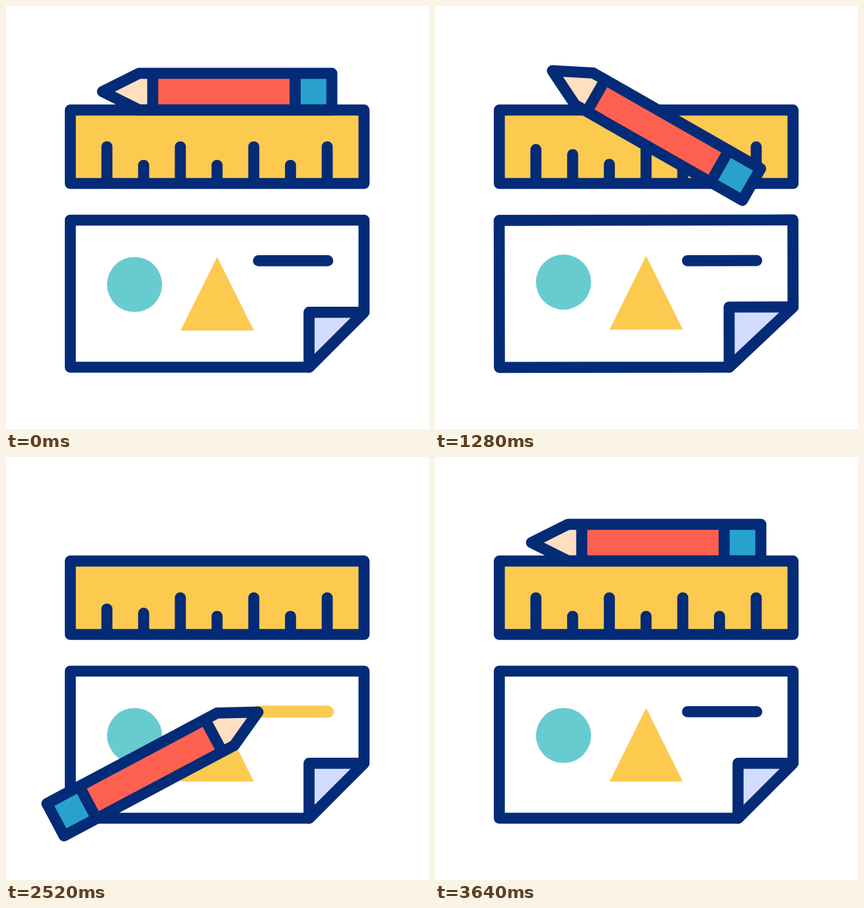
Animation of 640x640 px, one loop 4 s. Source, as an HTML page:

```html
<!DOCTYPE html>
<html lang="en">
<head>
<meta charset="utf-8">
<title>Drawing tools</title>
<style>
  html, body { margin: 0; width: 100%; height: 100%; overflow: hidden; background: #fff; }
  svg { display: block; width: 100vw; height: 100vh; }
  .ink { stroke: #032b77; stroke-width: 16.7; stroke-linecap: round; stroke-linejoin: round; fill: none; }
</style>
</head>
<body>
<svg viewBox="0 0 640 640">
  <rect class="ink" x="97.3" y="157.3" width="444.4" height="111.2" style="fill:#fdca50"/>
  <path class="ink" id="ticks"/>
  <g id="paper">
    <path class="ink" id="sheet" style="fill:#fff"/>
    <path class="ink" id="fold" style="fill:#d2dcfe"/>
    <circle id="disc" cx="194.5" cy="421.4" r="41.7" fill="#68cbd0"/>
    <path id="triangle" d="M319.5 379.7L375 491H264Z" fill="#fdca50"/>
    <path class="ink" d="M382 385.4H486.8"/>
  </g>
  <path id="mark" stroke="#fdca50" stroke-width="18.4" stroke-linecap="round"/>
  <g id="pencil">
    <path d="M-173.5 0L-118-27.7H-97.5V27.7H-118Z" fill="#fedfc0"/>
    <path d="M-97.5-27.7H118V27.7H-97.5Z" fill="#ff6150"/>
    <path d="M118-27.7H173.5V27.7H118Z" fill="#28a2cd"/>
    <path class="ink" d="M-173.5 0L-118-27.7H173.5V27.7H-118ZM-97.5-27.7V27.7M118-27.7V27.7"/>
  </g>
</svg>
<script>
const LOOP = 4000, STEP = 40;
const $ = id => document.getElementById(id);
const set = (id, name, value) => $(id).setAttribute(name, value);
const mix = (a, b, k) => a + (b - a) * k;

// Sine ease from 0 to 1; a power below 1 speeds up the beginning.
function ease(t, start, end, power = 1) {
  const p = Math.min(1, Math.max(0, (t - start) / (end - start)));
  return (1 - Math.cos(Math.PI * p ** power)) / 2;
}

// Value at t on a track of alternating times and values.
function track(t, ...keys) {
  let value = keys[1];
  for (let i = 2; i < keys.length; i += 2) {
    if (t >= keys[i - 2]) value = mix(keys[i - 1], keys[i + 1], ease(t, keys[i - 2], keys[i]));
  }
  return value;
}

function bezier(a, b, c, d, s) {
  const r = 1 - s;
  return a * r ** 3 + 3 * b * r * r * s + 3 * c * r * s * s + d * s ** 3;
}

function drawTicks(t) {
  let d = "";
  for (let i = 0; i < 7; i++) {
    const start = 480 + 117 * (6 - i), period = 780;
    const phase = Math.min(2, Math.max(0, (t - start) / period));
    const swing = 28 * (1 - Math.cos(2 * Math.PI * phase)) / 2;
    const top = i % 2 ? 241 - swing : 213 + swing;
    d += `M${152.7 + 55.55 * i} 268V${top}`;
  }
  set("ticks", "d", d);
}

function drawPaper(t) {
  const tilt = track(t, 0, 0, 280, -4, 650, 4, 1000, -2, 1320, 0);
  const curl = track(t, 0, 0, 280, -1, 660, 1.1, 1100, -.7, 1720, 0);
  const y = 463.3 + 13.5 * curl, x = 458.5 + 24 * curl;
  set("paper", "transform", `rotate(${tilt} 319.5 435.4)`);
  set("sheet", "d", `M97.3 324H541.7V${y}L${x} 546.5H97.3Z`);
  set("fold", "d", `M541.7 ${y}H${x}V546.5Z`);
  const discY = track(t, 100, 0, 380, -8, 760, 8, 1100, -8, 1540, 3.7, 1800, 0);
  const triangleY = track(t, 0, 0, 280, -15, 640, 15, 1040, -14, 1480, 8, 1760, 0);
  set("disc", "transform", `translate(0 ${discY})`);
  set("triangle", "transform", `translate(0 ${triangleY})`);
}

function drawPencil(t) {
  const stroke = ease(t, 1840, 2440), back = ease(t, 2760, 3440);
  let x, y, angle;
  if (t < 2760) {
    const go = ease(t, 1080, 1840);
    x = bezier(319.5, 340, 345, 333.6, go) - 105.5 * stroke;
    y = mix(129.5, 467.3, go);
    angle = 152 * ease(t, 1070, 1790);
  } else {
    x = bezier(228.1, 265, 513, 319.5, back);
    y = bezier(467.3, 366, 298.5, 129.5, back);
    angle = 152 * (1 - ease(t, 2780, 3470, .9));
  }
  set("pencil", "transform", `translate(${x} ${y}) rotate(${angle})`);

  const left = mix(486.8, 382, stroke), right = mix(486.8, 382, back);
  set("mark", "d", right > left ? `M${left} 385.4H${right}` : "");
}

function frame(now) {
  const t = Math.floor(now % LOOP / STEP) * STEP;
  drawTicks(t);
  drawPaper(t);
  drawPencil(t);
  requestAnimationFrame(frame);
}
frame(0);
</script>
</body>
</html>
```
